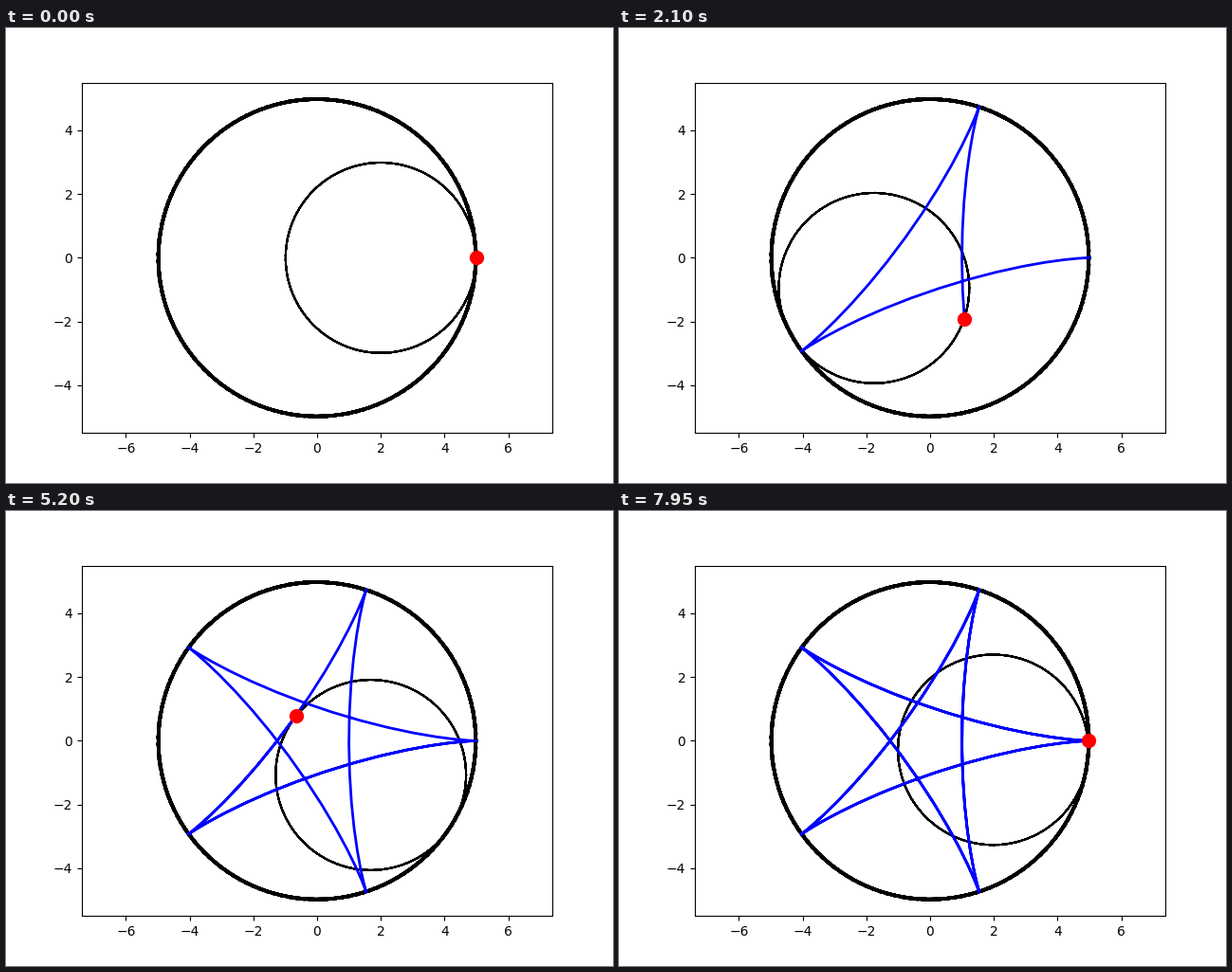
A matplotlib script for the animation above (8000 ms loop, 640 by 480 pixels).

```python
import numpy as np
import matplotlib.pyplot as plt
from matplotlib.animation import FuncAnimation

R, r = 5, 3
FRAMES, INTERVAL = 160, 50

# Coarse sampling: the overlapping polygons give the circles their rough edge
t = np.linspace(0, 30 * np.pi, 400)
cx, cy = (R - r) * np.cos(t), (R - r) * np.sin(t)
spin = (R - r) / r * t
px, py = cx + r * np.cos(spin), cy - r * np.sin(spin)

fig, ax = plt.subplots(figsize=(6.4, 4.8), dpi=100)
ax.plot(R * np.cos(t), R * np.sin(t), "k", lw=2)
wheel, = ax.plot(cx[0] + r * np.cos(t), cy[0] + r * np.sin(t), "k", lw=1)
trail, = ax.plot([], [], "b", lw=2)
dot, = ax.plot([px[0]], [py[0]], "ro", ms=10)
ax.axis("equal")


def update(i):
    wheel.set_data(cx[i] + r * np.cos(t), cy[i] + r * np.sin(t))
    trail.set_data(px[:i + 1], py[:i + 1])
    dot.set_data([px[i]], [py[i]])
    return wheel, trail, dot


anim = FuncAnimation(fig, update, frames=FRAMES, interval=INTERVAL,
                     repeat=True, repeat_delay=0)
plt.show()
```
